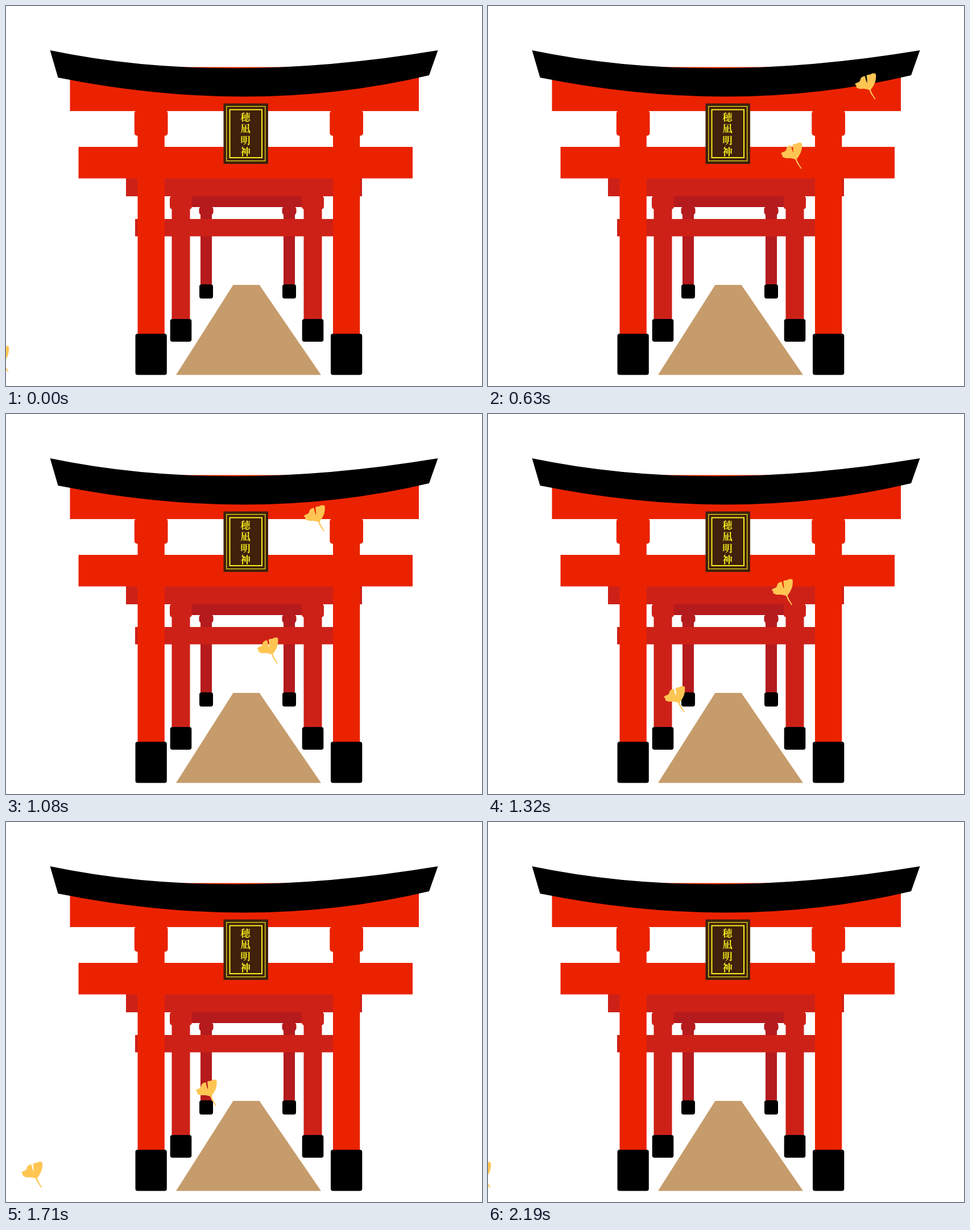
Animation, 837 px wide and 669 px high, one loop 2.7 s. Source, as an HTML page with a canvas:

```html
<!DOCTYPE html>
<html lang="ja">
<head>
<meta charset="utf-8">
<title>Torii and ginkgo leaves</title>
<style>
html, body { margin: 0; width: 100%; height: 100%; overflow: hidden; background: #fff; }
canvas { display: block; }
</style>
</head>
<body>
<canvas id="stage" width="837" height="669"></canvas>
<script>
const ctx = document.getElementById('stage').getContext('2d');
const LOOP = 2700, STEP = 30;
const FIRST = 90, SECOND = 510, SWOOP = 540, GLIDE = 1140;
const END = SECOND + SWOOP + GLIDE;
const RED = '#eb2200', MIDDLE = '#cd2118', BACK = '#b51a1c', GOLD = '#f8ee1f';

const leafShape = new Path2D(
  'M0 19.5 C3 16 8 17.5 9.5 12.5 C10 8 14 5.5 18 5.5 C18.5 10 20 14 21.5 18 C22 13 21 8 20.5 4.5 ' +
  'C23 2 26 3.5 28 2 C31 0 35 0 37 2 C38 12 35 21 28 29 C29 35 33 39 36.5 46 ' +
  'L35 46.5 C31 40 27 36 26 30.5 C21 27.5 14 28 9 28 C7 28 5 26 3 26 C3 23 2 21 0 19.5 Z');

function rect(x1, y1, x2, y2, color, radius = 0) {
  ctx.fillStyle = color;
  ctx.beginPath();
  ctx.roundRect(x1, y1, x2 - x1, y2 - y1, radius);
  ctx.fill();
}

// A pillar with its wider cap and black base
function pillar(x, width, top, bottom, color, cap, capHeight, base, baseHeight) {
  const right = x + width;
  rect(x, top, right, bottom, color);
  rect(x - cap, top, right + cap, top + capHeight, color, 5);
  rect(x - base, bottom, right + base, bottom + baseHeight, '#000', 4);
}

function frame(inset, width) {
  ctx.strokeStyle = GOLD;
  ctx.lineWidth = width;
  ctx.strokeRect(382.5 + inset, 171.5 + inset, 78.5 - 2 * inset, 106.5 - 2 * inset);
}

function plaque() {
  rect(382.5, 171.5, 461, 278, '#3f210c');
  frame(5.3, 1.2);
  frame(11, 2);
  ctx.fillStyle = GOLD;
  ctx.font = '900 17.5px "Noto Serif CJK JP", "Noto Sans CJK JP", "Noto Sans CJK", serif';
  ctx.textAlign = 'center';
  ctx.textBaseline = 'middle';
  [...'穂凪明神'].forEach((c, i) => ctx.fillText(c, 421, 195.5 + i * 20.2));
}

function roof() {
  ctx.fillStyle = '#000';
  ctx.beginPath();
  ctx.moveTo(77.5, 78);
  ctx.quadraticCurveTo(380, 141, 759.5, 78);
  ctx.lineTo(744, 122);
  ctx.quadraticCurveTo(436, 195, 91.5, 126);
  ctx.fill();
}

function scene() {
  rect(0, 0, 837, 669, '#fff');

  rect(310, 330, 540, 354, BACK);
  for (const x of [342, 488]) pillar(x, 20, 353, 490, BACK, 2.5, 15, 2, 25);

  ctx.fillStyle = '#c69c6c';
  ctx.fill(new Path2D('M399.5 491 H445.5 L554 649.5 H299 Z'));

  rect(211, 290, 626, 335, MIDDLE);
  rect(227, 375, 610, 405.5, MIDDLE);
  for (const x of [291.5, 523.5]) pillar(x, 32, 334, 551, MIDDLE, 3.5, 24, 2.8, 40);

  rect(112.5, 107.5, 726, 185, RED);
  rect(127.5, 248, 715, 303.5, RED);
  for (const x of [231.5, 575]) pillar(x, 47.3, 184, 577, RED, 5.7, 44.5, 4, 72.5);
  roof();
  plaque();
}

function bezier(a, b, c, d, u) {
  const v = 1 - u;
  return [0, 1].map(k =>
    v * v * v * a[k] + 3 * v * v * u * b[k] + 3 * v * u * u * c[k] + u * u * u * d[k]);
}

// A quick swoop to the turning point, then a long glide to the left edge
function leaf(age, swoop, turn, glide) {
  if (age < 0 || age > SWOOP + GLIDE) return;
  const [x, y] = age < SWOOP
    ? bezier([785, 26], ...swoop, turn, age / SWOOP)
    : bezier(turn, ...glide, (age - SWOOP) / GLIDE);
  ctx.save();
  ctx.translate(x, y);
  ctx.fillStyle = '#ffc553';
  ctx.fill(leafShape);
  ctx.restore();
}

function draw(now) {
  const t = Math.floor((now % LOOP) / STEP) * STEP;
  // The last pose rests until the next fall begins
  const pose = t < FIRST ? END : Math.min(t, END);
  scene();
  leaf(pose - FIRST, [[614, 398], [484, 186]], [515, 240], [[580, 354], [271, 525], [-19, 612]]);
  leaf(pose - SECOND, [[524, 249], [509, 32]], [522, 142], [[549, 374], [311, 499], [-32, 598]]);
}

let start;
function tick(now) {
  start ??= now;
  draw(now - start);
  requestAnimationFrame(tick);
}
draw(0);
requestAnimationFrame(tick);
</script>
</body>
</html>
```
